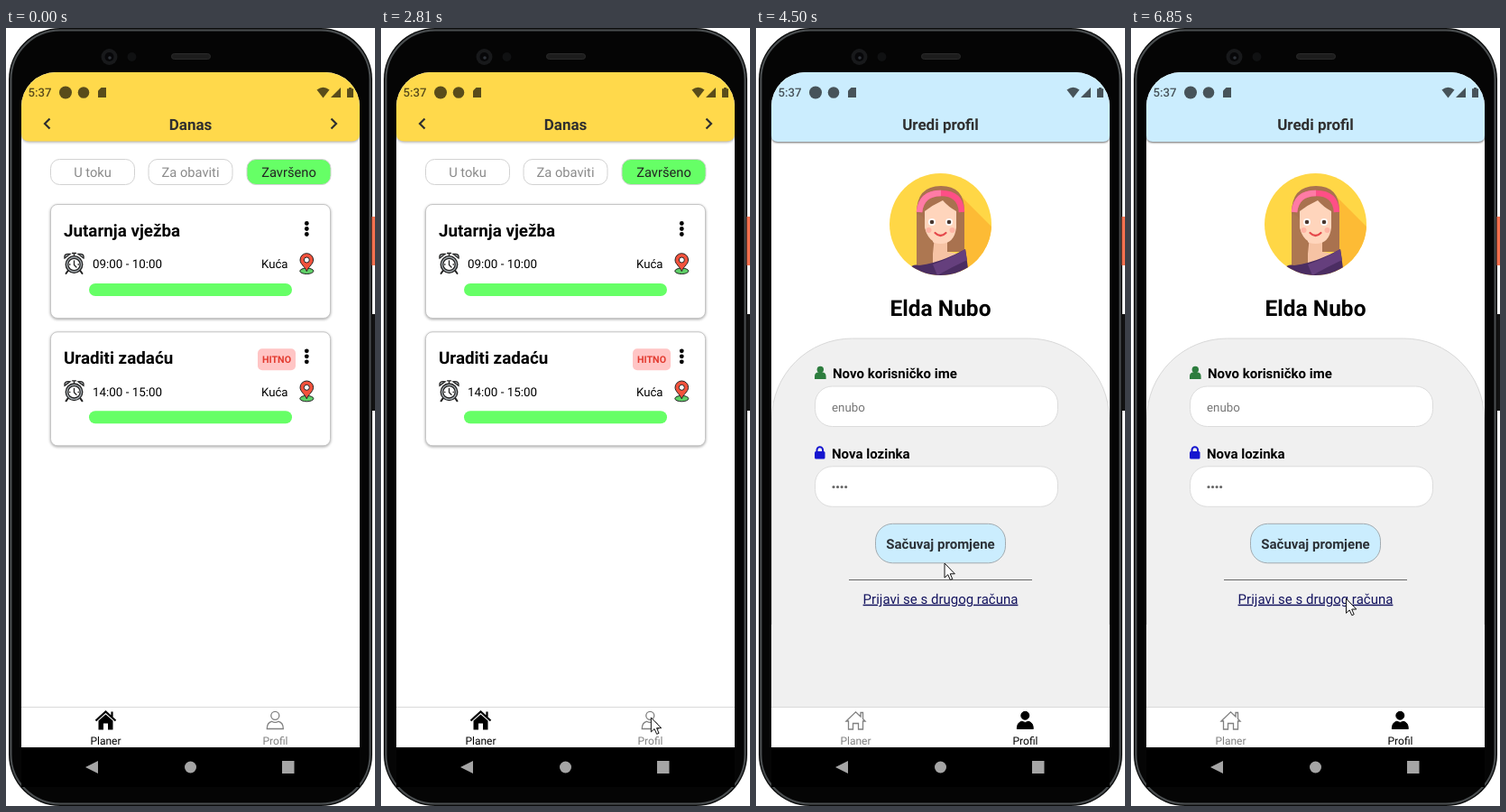
Animation of 409 by 862 pixels, one loop 8 s. Source, as an HTML page:

```html
<!DOCTYPE html>
<html lang="bs">
<head>
<meta charset="utf-8">
<title>Planer</title>
<style>
html, body { margin: 0; width: 100%; height: 100%; overflow: hidden; background: #fff; }
svg { display: block; width: 409px; height: 862px; font-family: Roboto, Arial, sans-serif; text-rendering: geometricPrecision; }
.b { font-weight: 700; }
.mid { text-anchor: middle; }
.h { font-size: 17px; font-weight: 700; fill: #2f2f2f; text-anchor: middle; }
.chip { font-size: 14.7px; text-anchor: middle; }
.tab { font-size: 12px; text-anchor: middle; }
.field { fill: #fff; stroke: #dcdcdc; }
.sh { filter: drop-shadow(0 1.5px 1.5px rgba(0,0,0,.35)); }
.deep { filter: drop-shadow(0 1.5px 1px rgba(0,0,0,.6)); }
</style>
</head>
<body>
<svg viewBox="0 0 409 862">
<defs>
  <clipPath id="screen"><path d="M17 841V87A38 38 0 0 1 55 49H354A38 38 0 0 1 392 87V841Z"/></clipPath>
  <clipPath id="disc"><circle cx="204.5" cy="217.5" r="56.5"/></clipPath>

  <g id="clock" stroke="#222" stroke-width="1.3" stroke-linecap="round">
    <path d="M69 268.500L66.500 272M82 268.500L84.500 272" stroke-width="2"/>
    <path d="M65 255Q64 249.500 71 250.500ZM86 255Q87 249.500 80 250.500Z" fill="#bfc4c8"/>
    <path d="M75.500 252V249.500M73.500 249.500H77.500"/>
    <circle cx="75.500" cy="262" r="9.300" fill="#a9b0b5"/>
    <circle cx="75.500" cy="262" r="6.700" fill="#fff"/>
    <path d="M75.500 258V262.500L78 265M70.500 262H71M80 262H80.500" fill="none"/>
  </g>
  <g id="pin" stroke="#222">
    <ellipse cx="333.300" cy="269.300" rx="7.500" ry="3.200" fill="#5fd068"/>
    <path d="M333.300 269.500C331 264 326 261.500 326 257A7.300 7.300 0 0 1 340.600 257C340.600 261.500 335.600 264 333.300 269.500Z" fill="#f4523c"/>
    <circle cx="333.300" cy="257" r="3" fill="#fff"/>
  </g>
  <g id="card">
    <rect class="sh" x="49.500" y="195.500" width="310" height="126" rx="7.500" fill="#fff" stroke="#c6c6c6"/>
    <use href="#clock"/><use href="#pin"/>
    <g fill="#000"><circle cx="333.300" cy="216.500" r="2.400"/><circle cx="333.300" cy="222.500" r="2.400"/><circle cx="333.300" cy="228.500" r="2.400"/></g>
    <text x="283" y="266.300" font-size="13.200">Kuća</text>
    <rect x="92" y="283" width="225" height="14" rx="7" fill="#66ff66"/>
  </g>

  <g id="homeOn">
    <path d="M102.500 767.500L110.500 760.500L118.500 767.500V777.500H113V770.500H108V777.500H102.500Z"/>
    <path d="M99.500 767.500L110.500 757.500L121.500 767.500M117.500 757.500V763" fill="none" stroke="#000" stroke-width="2.200"/>
  </g>
  <path id="homeOff" d="M100 768L110.500 757.800L116 763V758.500H118.500V765.500L121 768H118.500V777H113.500V770.500H107.500V777H102.500V768Z" fill="none" stroke="#808080" stroke-width="1.300"/>
  <g id="person"><circle cx="298.300" cy="761.800" r="4.500"/><path d="M289.300 776.500Q289.300 769.500 294.500 768.300Q298.300 770.500 302.100 768.300Q307.300 769.500 307.300 776.500Z"/></g>
</defs>

<!-- phone -->
<rect x="3" y="0" width="403" height="862" rx="57" fill="#0c0d0d"/>
<rect x="5.500" y="2.500" width="398" height="857" rx="54.500" fill="#050505" stroke="#4a4e50" stroke-width="2"/>
<rect x="405.500" y="209" width="4" height="54" fill="#f4714f"/>
<rect x="405.500" y="317" width="4" height="107" fill="#111"/>
<circle cx="114.500" cy="32" r="9" fill="#18191b"/>
<circle cx="114.500" cy="32" r="5" fill="#070709"/>
<circle cx="115" cy="33" r="1.800" fill="#30343c"/>
<circle cx="139.500" cy="32" r="5" fill="#101112"/>
<rect x="183.500" y="28.500" width="43" height="6" rx="3" fill="#1d1d1d" stroke="#2b2b2b"/>

<g clip-path="url(#screen)">
  <rect x="17" y="49" width="375" height="792" fill="#fff"/>

  <g id="plan">
    <path class="sh" d="M17 49H392V117Q392 125.500 383 125.500H26Q17 125.500 17 117Z" fill="#ffd94b"/>
    <text class="h" x="204.500" y="113">Danas</text>
    <path d="M48.500 100.500L43 106L48.500 111.500M360.500 100.500L366 106L360.500 111.500" fill="none" stroke="#2f2f2f" stroke-width="2.200"/>
    <g fill="#fff" stroke="#d2d2d2">
      <rect x="49.500" y="145.500" width="93" height="28" rx="10"/>
      <rect x="158" y="145.500" width="93" height="28" rx="10"/>
      <rect x="267" y="145.500" width="93" height="28" rx="10" fill="#66ff66"/>
    </g>
    <g class="chip" fill="#8a8a8a">
      <text x="96" y="165">U toku</text><text x="204.500" y="165">Za obaviti</text>
      <text x="313.500" y="165" fill="#222">Završeno</text>
    </g>
    <use href="#card"/>
    <text class="b" x="64" y="231" font-size="18.800">Jutarnja vježba</text>
    <text x="96" y="266.300" font-size="13.400">09:00 - 10:00</text>
    <g transform="translate(0 141.300)">
      <use href="#card"/>
      <text class="b" x="64" y="231" font-size="18.800">Uraditi zadaću</text>
      <text x="96" y="266.300" font-size="13.400">14:00 - 15:00</text>
      <rect x="279" y="214" width="42" height="24" rx="5" fill="#ffc5c5"/>
      <text class="b mid" x="300" y="229.800" font-size="10.700" fill="#e33b30">HITNO</text>
    </g>
  </g>

  <g id="profile">
    <path class="deep" d="M17 49H392V119Q392 126 385 126H24Q17 126 17 119Z" fill="#cbedfe"/>
    <text class="h" x="204.500" y="113">Uredi profil</text>

    <g clip-path="url(#disc)">
      <rect x="148" y="161" width="113" height="113" fill="#ffd746"/>
      <path d="M226 185L275 234V280H225Z" fill="#fdbb35"/>
      <path d="M178 264V205Q178 175 205 175T231 205V248H210L197 264Z" fill="#a9724f"/>
      <path d="M198 230H212V248Q222 249 228 252L196 264V250Z" fill="#f6c3a4"/>
      <path d="M187 203Q196 196 207 191Q213 198 222 203V221Q220 239 204.500 239T187 221Z" fill="#ffd5bc"/>
      <path d="M178 264V206Q184 207 187 212V222Q190 232 196 236V264Z" fill="#ad7751"/>
      <path d="M181 204Q183 183 205 183T228 204" fill="none" stroke="#ff4f86" stroke-width="6.500"/>
      <path d="M181 204Q183 183 205 183" fill="none" stroke="#ff7ba5" stroke-width="6.500"/>
      <path d="M170 280V266Q174 261 181 263Q205 260 232 245L237 280Z" fill="#4b2d62"/>
      <path d="M196 262Q216 255 232 245L234 257Q217 265 201 274Z" fill="#653f7d"/>
      <g fill="#fff"><circle cx="195" cy="215" r="4"/><circle cx="214" cy="215" r="4"/></g>
      <g fill="#49372f"><circle cx="195" cy="215" r="2.300"/><circle cx="214" cy="215" r="2.300"/></g>
      <g fill="#ffb5a5"><circle cx="191.500" cy="224" r="3"/><circle cx="217.500" cy="224" r="3"/></g>
      <path d="M198.500 227Q204.500 233 210.500 227" fill="none" stroke="#e5484b" stroke-width="2.200" stroke-linecap="round"/>
    </g>
    <text class="b mid" x="204.500" y="318.500" font-size="24.500">Elda Nubo</text>

    <rect x="17" y="640" width="375" height="113" fill="#f0f0f0"/>
    <path d="M17.500 661V433A89 89 0 0 1 106.500 344H302.500A89 89 0 0 1 391.500 433V661" fill="#f0f0f0" stroke="#d8d8d8"/>
    <g fill="#2d7d3e"><circle cx="71.300" cy="378.500" r="3.700"/><path d="M65 389V386Q65 381.500 69 381.500H73.500Q77.600 381.500 77.600 386V389Z"/></g>
    <g fill="#1515cf"><rect x="65" y="469" width="11.500" height="8.500" rx="1.500"/><path d="M67.500 470V467.500A3.300 3.300 0 0 1 74.100 467.500V470" fill="none" stroke="#1515cf" stroke-width="2"/></g>
    <g class="b" font-size="15"><text x="85" y="388">Novo korisničko ime</text><text x="84" y="476.500">Nova lozinka</text></g>
    <rect class="field" x="65.500" y="397" width="269" height="44.500" rx="19"/>
    <rect class="field" x="65.500" y="485.800" width="269" height="44.500" rx="19"/>
    <text x="84" y="424.500" font-size="13.300" fill="#777">enubo</text>
    <path d="M86 508.500h13.700" stroke="#666" stroke-width="3.200" stroke-linecap="round" stroke-dasharray="0 4.550"/>
    <rect x="132.500" y="549.300" width="144" height="43.500" rx="19" fill="#cbedfe" stroke="#a2abb0"/>
    <text class="b mid" x="204.500" y="577.300" font-size="15" fill="#2b3136">Sačuvaj promjene</text>
    <path d="M103 611.500H306" stroke="#686868"/>
    <text class="mid" x="204.500" y="637.700" font-size="15" fill="#14145f" text-decoration="underline">Prijavi se s drugog računa</text>
  </g>

  <!-- status bar -->
  <g fill="#000" opacity=".65">
    <text x="24.500" y="76" font-size="13.200" font-weight="500">5:37</text>
    <circle cx="66" cy="71.500" r="7"/><circle cx="86" cy="71.500" r="6.300"/>
    <path d="M105.500 66H111V77H102V69.500Z"/>
    <path d="M344.500 68.500Q351.500 63 358.500 68.500L351.500 77.500Z"/>
    <path d="M371 66V77H360Z"/>
    <path d="M378 67.300H380V66H383V67.300H385V77H378Z"/>
  </g>

  <!-- tab bar -->
  <rect x="17" y="752" width="375" height="45" fill="#fff"/>
  <path d="M17 752.500H392" stroke="#dadada"/>
  <g id="tabsPlan">
    <use href="#homeOn"/><use href="#person" fill="none" stroke="#808080" stroke-width="1.300"/>
    <g class="tab"><text x="110.500" y="794">Planer</text><text x="298.500" y="794" fill="#808080">Profil</text></g>
  </g>
  <g id="tabsProfile">
    <use href="#homeOff"/><use href="#person" stroke="#000"/>
    <g class="tab"><text x="110.500" y="794" fill="#808080">Planer</text><text x="298.500" y="794">Profil</text></g>
  </g>

  <rect x="17" y="797" width="375" height="44" fill="#000"/>
  <g fill="#a5a5a5"><path d="M88 819L102 812V826Z"/><circle cx="204.500" cy="819" r="6.500"/><rect x="306" y="812" width="13.500" height="14"/></g>
</g>

<path id="cursor" d="M.5 .8V16.800L4.200 13.400L6.800 19.200L9.200 18.200L6.700 12.500H11.800Z" fill="#fff" stroke="#111"/>
<circle id="click" cx="300" cy="772" r="15" fill="#ff0" opacity=".47"/>
</svg>
<script>
const LOOP = 8000, SWITCH = 3560, CLICK = 3160;
// first step, last step, number of steps, waypoints
const moves = [
  [730, 1210, 8, [[378, 848], [338, 755], [298, 672], [275, 647]]],
  [2400, 3010, 8, [[281, 681], [290, 720], [298, 758], [301, 776], [300, 772]]],
  [4220, 5000, 12, [[294, 755], [242, 645], [150, 500], [93, 415], [83, 393], [108, 426]]],
  [5070, 5140, 2, [[108, 447], [110.5, 468]]],
  [5210, 5840, 10, [[120, 490], [170, 549], [218, 586], [239, 594]]],
  [6170, 6240, 2, [[229, 628], [221, 650]]],
  [6440, 6580, 3, [[224, 645], [234, 634], [238, 628]]],
  [6780, 6850, 2, [[238, 630], [238, 631.5]]]
];
const el = id => document.getElementById(id);
const show = (id, on) => el(id).style.display = on ? '' : 'none';

function along(points, u) {
  const s = u * (points.length - 1), i = Math.min(Math.floor(s), points.length - 2);
  return points[i].map((v, k) => v + (points[i + 1][k] - v) * (s - i));
}

function cursorAt(t) {
  const move = moves.filter(m => t >= m[0]).pop();
  if (!move) return null;
  const [from, to, n, points] = move;
  const step = Math.min(n - 1, Math.floor((t - from) / (to - from) * (n - 1) + 1e-6));
  return along(points, step / (n - 1));
}

function draw(now) {
  const t = now % LOOP, onProfile = t >= SWITCH, pos = cursorAt(t);
  show('plan', !onProfile);
  show('tabsPlan', !onProfile);
  show('profile', onProfile);
  show('tabsProfile', onProfile);
  show('click', t >= CLICK && t < CLICK + 70);
  show('cursor', pos);
  if (pos) el('cursor').setAttribute('transform', `translate(${pos})`);
}

function loop() {
  draw(performance.now());
  requestAnimationFrame(loop);
}
loop();
</script>
</body>
</html>
```
